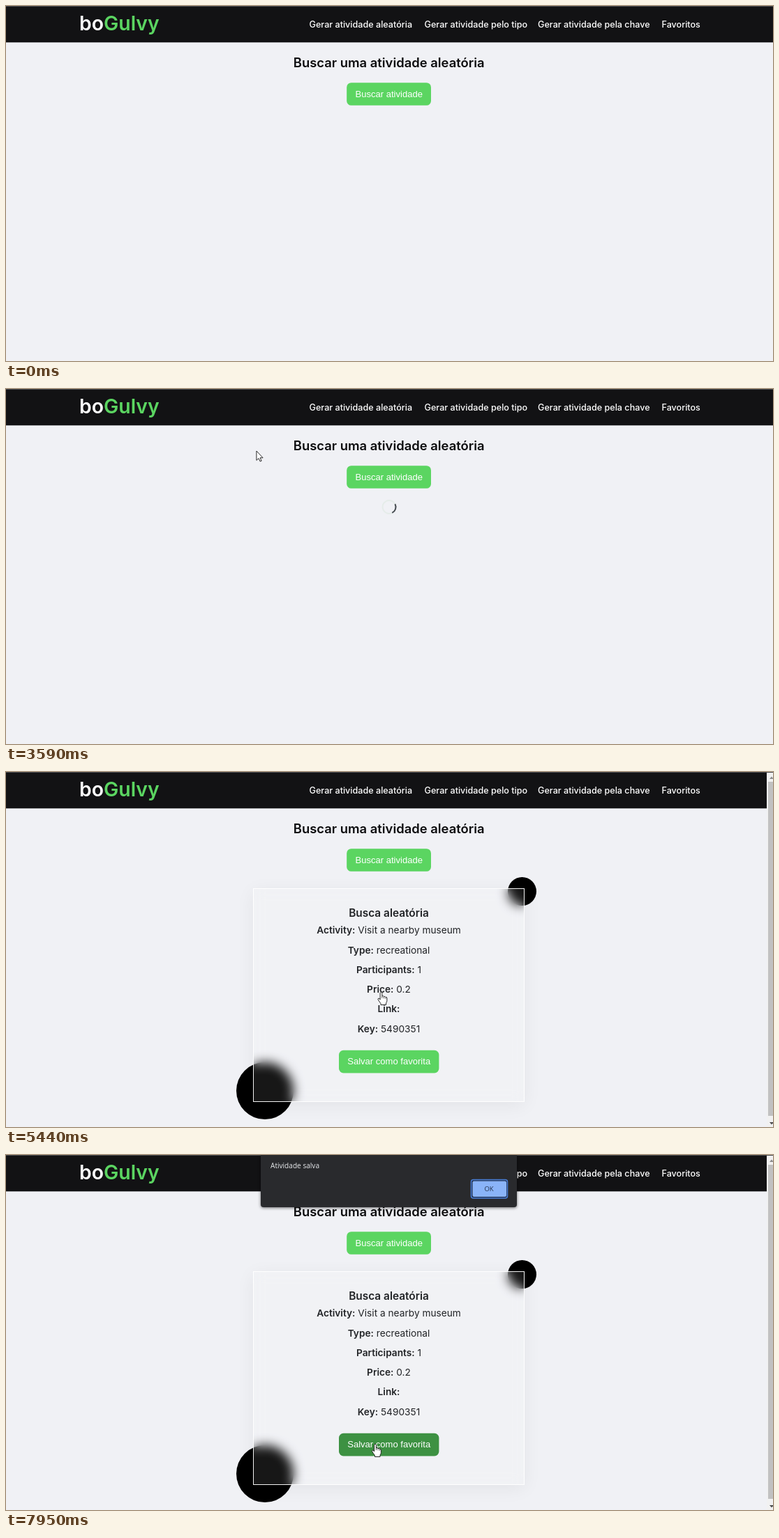
An HTML page for the animation above (8 s loop, 1099 px wide and 510 px high).

```html
<!DOCTYPE html>
<html lang="pt-BR">
<head>
<meta charset="utf-8">
<title>Buscar atividade</title>
<style>
  html, body { margin: 0; width: 100%; height: 100%; overflow: hidden; background: #f0f1f5; }
  #stage { position: relative; width: 1099px; height: 510px; overflow: hidden; background: #f0f1f5; }
  svg { position: absolute; left: 0; top: 0; }
  text { font-family: Inter, sans-serif; white-space: pre; }
  .nav { font-size: 12.6px; font-weight: 500; fill: #fff; }
  .logo { font-size: 28.4px; font-weight: 600; fill: #fff; }
  .title { font-size: 18.4px; font-weight: 600; fill: #0c0c0e; text-anchor: middle; }
  .button { font-family: "Liberation Sans", Arial, sans-serif; font-size: 13.06px; fill: #fff; text-anchor: middle; }
  .heading { font-size: 15.4px; font-weight: 600; text-anchor: middle; }
  .row { font-size: 13.7px; text-anchor: middle; }
  .row tspan { font-weight: 600; }
  .alert { font-family: "Open Sans", sans-serif; font-size: 10.1px; fill: #e8eaed; }
  .blob { position: absolute; background: #000; }
  #card {
    position: absolute; left: 354px; top: 167px; width: 387px; height: 305px;
    border: 1px solid rgba(255, 255, 255, .95);
    background: rgba(255, 255, 255, .09); background-clip: padding-box;
    backdrop-filter: blur(8px);
    box-shadow: 0 5px 25px rgba(0, 0, 0, .06);
  }
</style>
</head>
<body>
<div id="stage">
  <svg width="1099" height="510">
    <rect width="1099" height="52.3" fill="#121214"/>
    <rect width="1099" height="1" fill="#4b4c4f"/>
    <text class="logo" x="105" y="35">bo<tspan fill="#5bd561">Gulvy</tspan></text>
    <g class="nav">
      <text x="434.5" y="30.5">Gerar atividade aleatória</text>
      <text x="599.5" y="30.5">Gerar atividade pelo tipo</text>
      <text x="762" y="30.5">Gerar atividade pela chave</text>
      <text x="939.5" y="30.5">Favoritos</text>
    </g>
    <text class="title" x="548.7" y="87.5">Buscar uma atividade aleatória</text>
    <rect id="search" x="488.2" y="110.2" width="120.8" height="32.6" rx="6.5"/>
    <text class="button" x="548.7" y="131">Buscar atividade</text>
    <g id="spinner" fill="none" stroke-width="2">
      <circle r="9.5" stroke="#e5ece9"/>
      <path d="M-6.72 -6.72A9.5 9.5 0 0 1 6.72 -6.72" stroke="#454a50"/>
    </g>
  </svg>

  <div id="result">
    <div class="blob" id="upper"></div>
    <div class="blob" id="lower"></div>
    <div id="card"></div>
    <svg width="1099" height="510">
      <g id="details">
        <text class="heading" x="548.5" y="207.5">Busca aleatória</text>
        <text class="row" x="548.5" y="232"><tspan>Activity:</tspan> Visit a nearby museum</text>
        <text class="row" x="548.5" y="260.5"><tspan>Type:</tspan> recreational</text>
        <text class="row" x="548.5" y="288.5"><tspan>Participants:</tspan> 1</text>
        <text class="row" x="548.5" y="317"><tspan>Price:</tspan> 0.2</text>
        <text class="row" x="548.5" y="345"><tspan>Link:</tspan></text>
        <text class="row" x="548.5" y="373.5"><tspan>Key:</tspan> 5490351</text>
      </g>
      <rect id="save" x="477" y="399.8" width="143.4" height="32.6" rx="6.5"/>
      <text class="button" x="548.7" y="420">Salvar como favorita</text>
      <rect x="1090" y="1" width="9" height="509" fill="#f1f1f1"/>
      <rect x="1092" y="14" width="7" height="480" fill="#c1c1c1"/>
      <path d="M1094 10L1097 6.5L1100 10Z" fill="#8a8a8a"/>
      <path d="M1094 503L1097 506.5L1100 503Z" fill="#505050"/>
    </svg>
  </div>

  <svg width="1099" height="510">
    <g id="dialog">
      <path d="M365 0H732V71Q732 75 728 75H369Q365 75 365 71Z" fill="#292a2d"
        style="filter: drop-shadow(0 1px 2px rgba(0,0,0,.55))"/>
      <text class="alert" x="379" y="18.5">Atividade salva</text>
      <rect x="666.5" y="35.5" width="52" height="26.5" rx="3" fill="#202e4a" stroke="#4a7fd8" stroke-width="1.5"/>
      <rect x="668.5" y="37.5" width="48.5" height="22.5" rx="2" fill="#8ab4f8"/>
      <text class="alert" x="692" y="52.3" text-anchor="middle" style="fill: #25334d; font-size: 9.5px">OK</text>
    </g>
    <g id="cursor" fill="#fff" stroke="#111" stroke-width=".9" stroke-linejoin="round">
      <path id="arrow" d="M.4 .6V14L3.4 11.2L5.6 15.6L7.6 14.7L5.5 10.4H9.6Z"/>
      <g id="hand">
        <path d="M-1.4 1.3Q0 -.8 1.4 1.3V6Q3 5 4 6.6Q5.6 5.8 6.4 7.4Q8.4 7 8.4 9V12.5Q8.2 15 7 16V18.5H-.5V16.5Q-2.5 14.5 -4.6 10.4Q-4.2 8.4 -2.4 9.6L-1.4 11Z"/>
        <path d="M1.4 6V9M4 6.8V9.3M6.4 7.6V9.8" fill="none" stroke-width=".7"/>
      </g>
    </g>
  </svg>
</div>

<script>
const LOOP = 8000, START = 250, STEP = 70;
const SEARCH_ENTER = 1080, SEARCH_CLICK = 1700, SEARCH_LEAVE = 1960;
const CARD_IN = 4000, CARD_HOVER = 5013, HOVER_TIME = 400;
const SAVE_ENTER = 7000, SAVE_CLICK = 7260, ALERT_IN = 7660, FADE = 140;
const GREEN = [91, 213, 97], HOVER_GREEN = [80, 185, 87], DARK_GREEN = [61, 145, 66];
const WHITE = [255, 255, 255], INK = [33, 35, 38];

// Stops of the pointer: time, x, y
const STOPS = [
  [START, 1011, 479], [1020, 541, 151], [1370, 539, 124], [1710, 532, 124],
  [2270, 502, 230], [2420, 482, 224], [3300, 366, 88], [4080, 350.5, 90],
  [4540, 350.5, 90], [4800, 153, 210], [5080, 495.5, 353], [5430, 537.5, 316],
  [6000, 555, 245], [6400, 520, 182], [6650, 490, 270], [7180, 526, 407],
  [7400, 529, 415]
];

const $ = id => document.getElementById(id);
const clamp = v => Math.min(1, Math.max(0, v));
const mix = (a, b, p) => a + (b - a) * p;
const blend = (a, b, p) => `rgb(${a.map((v, i) => Math.round(mix(v, b[i], p)))})`;
const show = (id, on) => { $(id).style.display = on ? "" : "none"; };
const fill = (id, color) => $(id).setAttribute("fill", color);

// The picture is refreshed at a steady beat
const snap = t => t < START ? 0 : START + Math.floor((t - START) / STEP) * STEP;

// Same curve as the CSS "ease" keyword
function ease(x) {
  let lo = 0, hi = 1;
  for (let i = 0; i < 24; i++) {
    const s = (lo + hi) / 2;
    if (.75 * s * (1 - s) + s ** 3 < x) lo = s; else hi = s;
  }
  return .3 * lo * (1 - lo) ** 2 + 3 * lo * lo * (1 - lo) + lo ** 3;
}

const slope = (i, axis) =>
  (STOPS[i + 1][axis] - STOPS[i][axis]) / (STOPS[i + 1][0] - STOPS[i][0]);

// Speed at a stop; zero where the direction turns, so nothing overshoots
function speed(i, axis) {
  if (i === 0) return slope(0, axis);
  if (i === STOPS.length - 1) return 0;
  const a = slope(i - 1, axis), b = slope(i, axis);
  return a * b > 0 ? 2 * a * b / (a + b) : 0;
}

function pointerAt(t) {
  const last = STOPS.length - 1;
  if (t >= STOPS[last][0]) return STOPS[last].slice(1);
  const i = Math.max(0, STOPS.findIndex(k => k[0] > t) - 1);
  const span = STOPS[i + 1][0] - STOPS[i][0];
  const p = clamp((t - STOPS[i][0]) / span), q = 1 - p;
  return [1, 2].map(axis =>
    q * q * (1 + 2 * p) * STOPS[i][axis] + p * p * (3 - 2 * p) * STOPS[i + 1][axis]
    + p * q * span * (q * speed(i, axis) - p * speed(i + 1, axis)));
}

function place(id, x, y, w, h, p) {
  Object.assign($(id).style, {
    left: x + "px", top: y + "px", width: w + "px", height: h + "px",
    borderRadius: 50 * p + "%"
  });
}

// Two halves of the card shrink into circles at opposite corners
function drawCard(t) {
  const p = ease(clamp((t - CARD_HOVER) / HOVER_TIME));
  const shift = p ** .7;
  const w1 = mix(389, 41, p), h1 = mix(153.5, 41, p);
  const w2 = mix(389, 82, p), h2 = mix(153.5, 82, p);
  place("upper", mix(743, 759.5, shift) - w1, mix(167, 151, shift), w1, h1, p);
  place("lower", mix(354, 330, shift), mix(474, 498.7, shift) - h2, w2, h2, p);
  fill("details", blend(WHITE, INK, p));
  fill("save", t < SAVE_CLICK
    ? blend(GREEN, HOVER_GREEN, clamp((t - SAVE_ENTER) / FADE))
    : blend(HOVER_GREEN, DARK_GREEN, clamp((t - SAVE_CLICK) / FADE)));
}

function draw(time) {
  const t = snap(time);
  const onSearch = t >= SEARCH_ENTER && t < SEARCH_LEAVE;
  const pressed = t >= SEARCH_CLICK && t < SEARCH_CLICK + 100;
  fill("search", `rgb(${pressed ? DARK_GREEN : onSearch ? HOVER_GREEN : GREEN})`);

  show("spinner", t >= SEARCH_CLICK && t < CARD_IN);
  $("spinner").setAttribute("transform",
    `translate(549 169.5) rotate(${(t - SEARCH_CLICK) / 800 * 360})`);

  show("result", t >= CARD_IN);
  drawCard(t);

  show("dialog", t >= ALERT_IN);
  $("dialog").setAttribute("opacity", mix(.4, 1, clamp((t - ALERT_IN) / 180)));

  const [x, y] = pointerAt(t);
  const pointing = onSearch || t >= CARD_HOVER;
  show("cursor", t >= START);
  show("arrow", !pointing);
  show("hand", pointing);
  $("cursor").setAttribute("transform", `translate(${x} ${y})`);
}

const began = performance.now();
function tick() {
  draw((performance.now() - began) % LOOP);
  requestAnimationFrame(tick);
}
tick();
</script>
</body>
</html>
```
